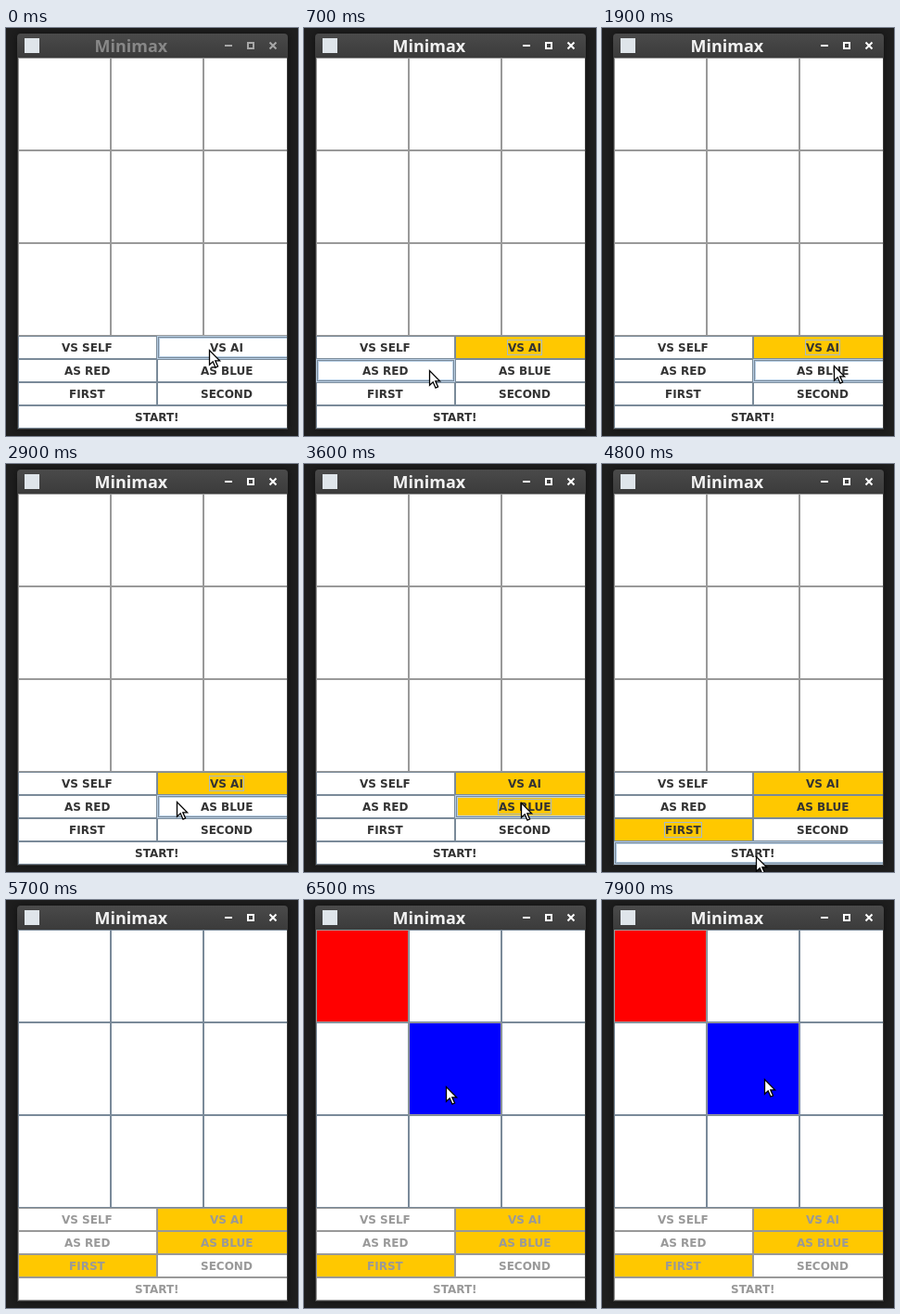
Write an HTML page with a canvas that moves like this. It is 315 by 440 pixels and loops after 8 s.

```html
<!DOCTYPE html>
<html lang="en">
<head>
<meta charset="utf-8">
<title>Minimax</title>
<style>
  html, body { margin: 0; width: 100%; height: 100%; overflow: hidden; background: #1e1e1e; }
  canvas { display: block; }
</style>
</head>
<body>
<canvas id="stage" width="315" height="440"></canvas>
<script>
const ctx = document.getElementById('stage').getContext('2d');
const LOOP = 8000, TICK = 100;
const EDGE = '#7a8a99', LIGHT = '#b8cfe5', FOCUS = '#a3b8cc', GREY = '#999999';
const GAME_START = 52, CURSOR_GONE = 57, CURSOR_BACK = 59, MARKED = 65;

// Pointer moves: first tick, number of ticks, destination.
const moves = [
  [5, 3, 135, 369], [9, 2, 249, 364], [19, 1, 250, 364], [21, 1, 251, 366],
  [24, 1, 232, 369], [26, 1, 135, 370], [29, 2, 233, 358], [33, 1, 234, 360],
  [35, 1, 234, 365], [37, 7, 100, 391], [46, 3, 166, 423], [CURSOR_BACK, 1, 78, 414],
  [60, 3, 153, 201], [67, 3, 150, 290], [72, 3, 70, 190], [77, 3, 175, 193]
];

const option = (label, col, row, click = Infinity, w = 150) =>
  ({ label, x: 13 + col * 150, y: 332 + row * 25, w, h: 25, click });
const options = [
  option('VS SELF', 0, 0), option('VS AI', 1, 0, 3),
  option('AS RED', 0, 1), option('AS BLUE', 1, 1, 35),
  option('FIRST', 0, 2, 44), option('SECOND', 1, 2),
  option('START!', 0, 3, 51, 300)
];
const cells = Array.from({ length: 9 }, (_, i) => ({
  x: 13 + i % 3 * 100, y: 32 + Math.floor(i / 3) * 100, w: 100, h: 100,
  click: i === 4 ? 64 : Infinity,
  mark: { 0: '#ff0000', 4: '#0000ff' }[i]
}));

function pointerAt(tick) {
  let x = 219, y = 347;
  for (const [start, steps, toX, toY] of moves) {
    if (tick < start) break;
    const p = Math.min(1, (tick - start + 1) / steps);
    x += (toX - x) * p;
    y += (toY - y) * p;
  }
  return { x: Math.round(x), y: Math.round(y), visible: tick < CURSOR_GONE || tick >= CURSOR_BACK };
}

function rect(x, y, w, h, color) {
  ctx.fillStyle = color;
  ctx.fillRect(x, y, w, h);
}

function outline({ x, y, w, h }, inset, color) {
  ctx.strokeStyle = color;
  ctx.lineWidth = 1;
  ctx.strokeRect(x + inset + .5, y + inset + .5, w - 2 * inset - 1, h - 2 * inset - 1);
}

function drawButton(b, { fill, enabled, pressed, hover, focused }) {
  rect(b.x, b.y, b.w, b.h, pressed ? LIGHT : fill);
  if (hover && !pressed) {
    outline(b, 0, LIGHT);
    outline(b, 1, EDGE);
    outline(b, 2, LIGHT);
  } else {
    outline(b, 0, enabled ? EDGE : GREY);
    if (pressed) {
      rect(b.x, b.y, b.w, 2, EDGE);
      rect(b.x, b.y, 2, b.h, EDGE);
    }
  }
  if (!b.label) return;
  ctx.font = 'bold 12px "DejaVu Sans", sans-serif';
  const width = Math.round(ctx.measureText(b.label).width);
  const x = b.x + Math.floor((b.w - width) / 2);
  if (focused) outline({ x: x - 1, y: b.y + 4, w: width + 2, h: 17 }, 0, FOCUS);
  ctx.fillStyle = enabled ? '#333333' : GREY;
  ctx.fillText(b.label, x, b.y + 17);
}

function drawWindow(active) {
  rect(0, 0, 315, 440, '#1e1e1e');
  const bar = ctx.createLinearGradient(0, 6, 0, 32);
  bar.addColorStop(0, '#4a4a4a');
  bar.addColorStop(1, '#3b3b3b');
  ctx.save();
  ctx.shadowColor = 'rgba(0,0,0,.5)';
  ctx.shadowBlur = 10;
  ctx.fillStyle = bar;
  ctx.beginPath();
  ctx.roundRect(12, 6, 292, 427, [4, 4, 0, 0]);
  ctx.fill();
  ctx.restore();

  rect(20, 11, 16, 16, '#dfe5ea');
  ctx.font = 'bold 18px "Noto Sans", "Open Sans", sans-serif';
  ctx.fillStyle = active ? '#f2f2f2' : '#888888';
  ctx.fillText('Minimax', 95.5, 26);

  const ink = active ? '#ffffff' : '#a8a8a8';
  rect(236, 18, 8, 2, ink);
  ctx.strokeStyle = ink;
  ctx.lineWidth = 2;
  ctx.strokeRect(261, 16, 6, 6);
  ctx.beginPath();
  ctx.moveTo(284.5, 15.5); ctx.lineTo(291.5, 22.5);
  ctx.moveTo(291.5, 15.5); ctx.lineTo(284.5, 22.5);
  ctx.stroke();
}

const arrow = new Path2D('M.5 .5V16.2L4.2 12.8L7 19.2L9.6 18L6.8 11.8H11.6Z');

function drawPointer({ x, y }) {
  ctx.save();
  ctx.translate(x, y);
  ctx.fillStyle = '#ffffff';
  ctx.strokeStyle = '#000000';
  ctx.lineWidth = 1.3;
  ctx.fill(arrow);
  ctx.stroke(arrow);
  ctx.restore();
}

function draw(tick) {
  const pointer = pointerAt(tick);
  const playing = tick >= GAME_START;
  const clicked = options.filter(b => b.click <= tick);
  const latest = clicked[clicked.length - 1];
  const isOver = b => pointer.visible && pointer.x >= b.x && pointer.x < b.x + b.w &&
    pointer.y >= b.y && pointer.y < b.y + b.h;
  const state = (b, enabled, fill) =>
    ({ fill, enabled, pressed: tick === b.click, hover: enabled && isOver(b) });

  drawWindow(tick >= 3);
  ctx.save();
  ctx.beginPath();
  ctx.rect(13, 32, 290, 400);
  ctx.clip();
  for (const cell of cells) {
    const taken = cell.mark && tick >= MARKED;
    drawButton(cell, state(cell, playing && !taken, taken ? cell.mark : '#ffffff'));
  }
  for (const b of options) {
    const selected = tick > b.click && b.label !== 'START!';
    drawButton(b, {
      ...state(b, !playing, selected ? '#ffc800' : '#ffffff'),
      focused: !playing && b === latest
    });
  }
  ctx.restore();
  if (pointer.visible) drawPointer(pointer);
}

const begin = performance.now();
function loop() {
  draw(Math.floor((performance.now() - begin) % LOOP / TICK));
  requestAnimationFrame(loop);
}
loop();
</script>
</body>
</html>
```
